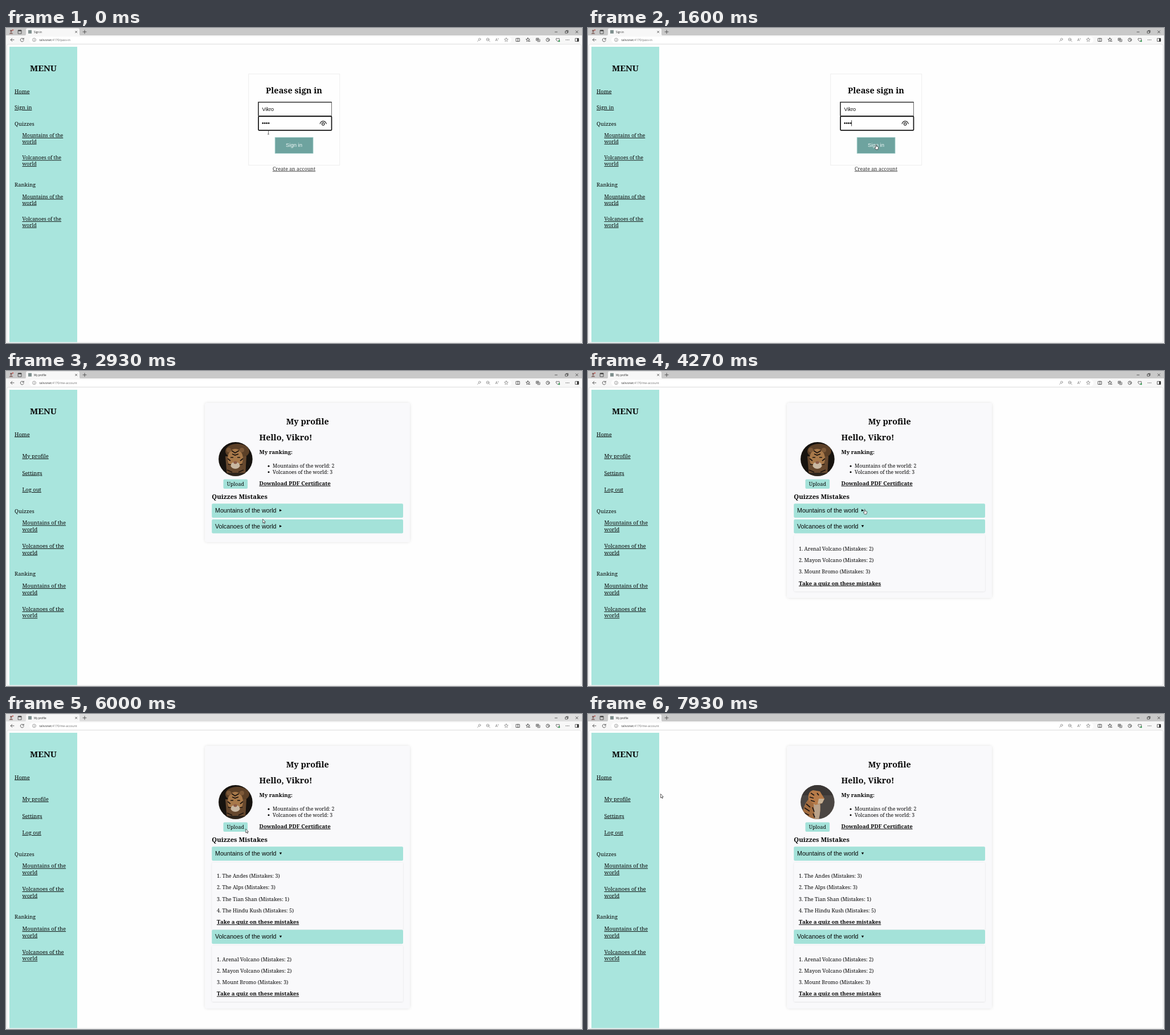
An HTML page that plays this animation: 1011x554 px, repeating every 8 s.

```html
<!DOCTYPE html>
<html lang="en">
<head>
<meta charset="utf-8">
<title>Quiz profile</title>
<style>
  html, body { margin: 0; width: 100%; height: 100%; overflow: hidden; background: #fff; }
  svg { display: block; width: 1011px; height: 554px; }
  .serif { font-family: "Noto Serif", serif; }
  .sans { font-family: "Liberation Sans", Arial, sans-serif; }
  .ui { font-family: "Open Sans", sans-serif; }
  .bold { font-weight: 700; }
  .link { text-decoration: underline; }
  .mid { text-anchor: middle; }
  .icon { fill: none; stroke: #3c3c3c; stroke-width: .8; stroke-linecap: round; }
  .pale { stroke: #8b8b8b; }
</style>
</head>
<body>
<svg id="stage" viewBox="0 0 1011 554" xmlns="http://www.w3.org/2000/svg"></svg>
<script>
const LOOP = 8000;
const STEP = 1000 / 15;
const MINT = '#a4e2d9';
const USER = 'Vikro';
const LIST_SHIFT = 118.7;

const text = (x, y, size, label, cls = 'serif', fill = '#080808') =>
  `<text x="${x}" y="${y}" font-size="${size}" class="${cls}" fill="${fill}">${label}</text>`;
const rect = (x, y, w, h, fill, extra = '') =>
  `<rect x="${x}" y="${y}" width="${w}" height="${h}" fill="${fill}" ${extra}/>`;
const group = (id, content, extra = '') => `<g id="${id}" ${extra}>${content}</g>`;
const icon = (d, cls = '') => `<path class="icon ${cls}" d="${d}"/>`;
const ring = (x, y, r, cls = '') => `<circle class="icon ${cls}" cx="${x}" cy="${y}" r="${r}"/>`;

function star(x, y, cls) {
  const points = Array.from({ length: 10 }, (_, i) => {
    const a = i * Math.PI / 5, r = i % 2 ? 1.6 : 3.5;
    return `${(x + r * Math.sin(a)).toFixed(2)} ${(y - r * Math.cos(a)).toFixed(2)}`;
  });
  return icon(`M${points.join('L')}Z`, cls);
}

function browser() {
  return rect(0, 0, 1011, 14, '#c9c9c9', 'id="titlebar"')
    + rect(0, 13, 1011, 541, '#f7f7f7')
    + '<path d="M32 13.5Q35 13.5 35 10.5V3.5Q35 .5 38 .5H126Q129 .5 129 3.5V10.5Q129 13.5 132 13.5Z" fill="#f7f7f7"/>'
    // tab strip
    + '<circle cx="9" cy="5" r="1.8" fill="#7b5550"/><path d="M5.5 10.5Q9 4.5 12.5 10.5Z" fill="#8b706c"/><circle cx="12" cy="3.6" r="1.1" fill="#c8403a"/>'
    + icon('M21.5 4H27V10H21.5Z') + rect(21.5, 3.7, 5.5, 1.8, '#333')
    + rect(39, 3.7, 6, 6, '#7f8f8e')
    + text(49, 8.7, 4.6, '', 'ui', '#222').replace('<text', '<text id="tabTitle"')
    + icon('M121.7 5.4L124.7 8.4M124.7 5.4L121.7 8.4M135 6.8H141M138 3.8V9.8')
    + icon('M963.5 7H967.5M982 5.5H985.5V9H982ZM983.3 5.3V4.3H986.7V7.8H985.7M1000 4.8L1004 8.8M1004 4.8L1000 8.8')
    // address row
    + rect(41, 15.2, 846, 11.6, '#fff', 'rx="5.8"')
    + icon('M14 20.8H8.2M10.8 18.2L8.2 20.8L10.8 23.4')
    + icon('M30.9 19.5A3 3 0 1 0 31.2 21.8M31.2 17.8V19.8H29.2')
    + ring(49.5, 20.8, 3, 'pale') + icon('M49.5 20.5V22.3M49.5 19.1V19.2', 'pale')
    + `<text x="58.5" y="22.7" font-size="5.3" class="ui" fill="#333">talivonet:<tspan id="path" fill="#6d6d6d"></tspan></text>`
    + ring(831.2, 19.8, 1.8, 'pale') + icon('M830 21.2L827.6 23.6', 'pale')
    + ring(845.6, 20.2, 2.4, 'pale') + icon('M847.5 22L849.4 24M844.5 20.2H846.7', 'pale')
    + text(858.8, 23.2, 6.6, 'A', 'ui', '#777') + icon('M864 18Q865 19 864 20', 'pale')
    + star(878, 20.8, 'pale')
    + icon('M895.5 18.3H901.5V23.5H895.5ZM898.5 18V23.8')
    + star(916, 20.8) + icon('M917.5 23H920')
    + icon('M931 18H935V22H931ZM933 23.8H937V20M933 19V21M932 20H934')
    + ring(951, 20.8, 3) + icon('M951 19V21L952.5 21.5')
    + icon('M968.5 23.8L965.6 20.8Q965 18 967 18L968.5 19L970 18Q972 18 971.4 20.8Z')
    + '<circle cx="971" cy="23" r="1.4" fill="#2c9a4b"/>'
    + [983, 985.5, 988].map(x => `<circle cx="${x}" cy="20.8" r=".65" fill="#222"/>`).join('')
    + icon('M999.5 18.3H1005V23.5H999.5Z') + rect(1002.5, 18, 2.6, 5.8, '#222')
    // page
    + rect(1.5, 28.5, 1008, 524.5, '#fefefe', 'rx="3" stroke="#dedede" stroke-width=".8"')
    + rect(6, 33, 119, 519.5, '#a9e5dd')
    + text(65.5, 76, 15, 'MENU', 'serif bold mid');
}

// A section is a heading with two wrapped links below it.
function menuSection(title, y, size, first, gap, line) {
  return text(15, y, 9.4, title)
    + ['Mountains', 'Volcanoes'].map((name, i) => {
      const top = y + first + i * gap;
      return text(28.5, top, size, `${name} of the`, 'serif link')
        + text(28.5, top + line, size, 'world', 'serif link');
    }).join('');
}

function signInPage() {
  return text(15, 114.5, 9.3, 'Home', 'serif link')
    + text(15, 143, 9.3, 'Sign in', 'serif link')
    + menuSection('Quizzes', 171.5, 8.85, 20.5, 39.3, 10.8)
    + menuSection('Ranking', 279, 8.85, 20.7, 39.3, 10.8)
    + rect(425.7, 80.9, 160, 160.3, '#fefefe', 'stroke="#ececec" stroke-width=".9"')
    + text(505.5, 115, 14.5, 'Please sign in', 'serif bold mid')
    + rect(443, 130.5, 128.5, 24, '#fff', 'stroke="#5a5a5a" stroke-width=".9"')
    + '<path d="M443 154.5V130.5H571.5" fill="none" stroke="#2b2b2b" stroke-width="1.4"/>'
    + text(449.5, 145.6, 9.1, USER, 'sans')
    + rect(443.1, 155.3, 128.4, 24.6, '#fff', 'rx="1.2" stroke="#111" stroke-width="1.7"')
    + [0, 1, 2, 3].map(i => `<circle cx="${450.8 + i * 3.45}" cy="167.4" r="1.4" fill="#111"/>`).join('')
    + rect(462.3, 162.2, .8, 10.4, '#111', 'id="caret"')
    + '<path d="M551.2 168.4Q552.6 163.9 556.7 163.9T562.2 168.4" fill="none" stroke="#222" stroke-width="1.2" stroke-linecap="round"/>'
    + '<circle cx="556.7" cy="168.8" r="2.2" fill="none" stroke="#222" stroke-width="1.2"/>'
    + rect(472.2, 192.4, 66.8, 28.2, '#6ea39f', 'stroke="#9fcfca" stroke-width=".8"')
    + text(505.5, 209.4, 9.5, 'Sign in', 'sans mid', '#f4fbfa')
    + text(505.5, 250.7, 8.8, 'Create an account', 'serif link mid', '#333');
}

function frontPhoto() {
  return rect(373, 125, 60, 60, '#17130f')
    + '<ellipse cx="406" cy="141" rx="21" ry="13" fill="#5c4027"/>'
    + '<path d="M385 150L388 185H420L422 150Z" fill="#66482e"/>'
    + '<ellipse cx="402.5" cy="154" rx="13.5" ry="17" fill="#a8794a"/>'
    + '<circle cx="391" cy="139" r="4" fill="#7d5938"/><circle cx="414" cy="139" r="4" fill="#7d5938"/>'
    + '<ellipse cx="402.5" cy="166" rx="8" ry="6" fill="#c9b8a2"/><ellipse cx="402.5" cy="161" rx="3.2" ry="2.4" fill="#8c5b45"/>'
    + '<path d="M396 140L402 144L409 140M397 146L402 148L408 146M394 152H399M406 152H411M389 154L394 158M416 154L411 158M390 164L395 165M415 164L410 165M388 174L397 178M417 174L408 178" fill="none" stroke="#1d140e" stroke-width="1.7"/>'
    + rect(373, 179, 60, 6, '#2c241c');
}

function sidePhoto() {
  return rect(373, 125, 60, 60, '#4b4643')
    + rect(373, 125, 60, 18, '#3b3735')
    + '<path d="M376 185Q376 161 388 149L407 155Q409 170 405 185Z" fill="#a36d40"/>'
    + '<path d="M396 158L407 155Q409 170 405 185H398Z" fill="#b9a28a"/>'
    + '<path d="M387 151Q385 137 395 134L407 136L415 149L411 157L399 160Z" fill="#b67b49"/>'
    + '<path d="M405 149L415 149L411 157L403 158Z" fill="#c6b196"/>'
    + '<path d="M391 139L397 143M389 146L396 148M391 152L398 154M383 158L390 164M380 165L389 171M378 173L388 178M394 164L397 172M395 175L398 182M402 139L405 143" fill="none" stroke="#1e1815" stroke-width="1.8"/>';
}

function accordion(id, label, lines, y, height) {
  const rows = lines.map((line, i) => text(370, y + 55 + i * 20.15, 9, `${i + 1}. ${line}`)).join('');
  return rect(361.3, y, 335.7, 24.7, MINT, 'rx="2"')
    + text(367, y + 15.6, 10.7, label, 'sans')
    + group(id + 'Shut', `<path d="M480 ${y + 9.9}L484.2 ${y + 12}L480 ${y + 14.1}Z"/>`)
    + group(id + 'Open',
      `<path d="M479.8 ${y + 10.2}H484.2L482 ${y + 14}Z"/>`
      + rect(361.5, y + 27.8, 335.3, height, '#f9f9fb', 'rx="2" filter="url(#soft)"')
      + rows
      + text(370, y + 55.3 + lines.length * 20.15, 9.65, 'Take a quiz on these mistakes', 'serif bold link'));
}

function profilePage() {
  return text(15, 114.5, 9.4, 'Home', 'serif link')
    + ['My profile', 'Settings', 'Log out'].map((s, i) => text(28.5, 153 + i * 29.5, 9.4, s, 'serif link')).join('')
    + menuSection('Quizzes', 249.5, 9.45, 20.8, 40.7, 11.6)
    + menuSection('Ranking', 360.4, 9.45, 20.7, 40.7, 11.6)
    + rect(349.3, 56.3, 359.6, 244.5, '#f9f9fb', 'id="card" rx="4" filter="url(#shade)"')
    + text(529.2, 93.6, 14.4, 'My profile', 'serif bold mid')
    + text(444.5, 122, 14.4, `Hello, ${USER}!`, 'serif bold')
    + text(444.5, 146.3, 9.65, 'My ranking:', 'serif bold')
    + '<circle cx="461" cy="167.2" r="1.5"/><circle cx="461" cy="177.8" r="1.5"/>'
    + text(468, 170, 8.8, 'Mountains of the world: 2')
    + text(468, 180.6, 8.8, 'Volcanoes of the world: 3')
    + text(444.5, 200.8, 9.65, 'Download PDF Certificate', 'serif bold link')
    + group('frontPhoto', frontPhoto(), 'clip-path="url(#avatar)"')
    + group('sidePhoto', sidePhoto(), 'clip-path="url(#avatar)"')
    + rect(381.5, 190.6, 42.6, 16.4, MINT, 'rx="2"')
    + text(402.8, 202, 8.9, 'Upload', 'serif mid')
    + text(361.3, 224.8, 11.3, 'Quizzes Mistakes', 'serif bold')
    + accordion('mountains', 'Mountains of the world', [
      'The Andes (Mistakes: 3)', 'The Alps (Mistakes: 3)',
      'The Tian Shan (Mistakes: 1)', 'The Hindu Kush (Mistakes: 5)'], 233.2, 118)
    + group('volcanoes', accordion('volcano', 'Volcanoes of the world', [
      'Arenal Volcano (Mistakes: 2)', 'Mayon Volcano (Mistakes: 2)',
      'Mount Bromo (Mistakes: 3)'], 260.9, 98.7));
}

// Pointers have their hot spot at 0,0.
function pointers() {
  const look = 'fill="#fff" stroke="#222" stroke-width=".7" stroke-linejoin="round"';
  return group('pointer',
    group('beam', '<path d="M-1.5 -3.5H1.5M0 -3.5V3.5M-1.5 3.5H1.5" fill="none" stroke="#333" stroke-width=".7"/>')
    + group('arrow', `<path d="M0 0V7L1.6 5.6L2.7 8L3.8 7.5L2.7 5.2H4.8Z" ${look}/>`)
    + group('hand', `<path d="M-.7 .7Q0 -.5 .7 .7V3.2L3.8 4Q4.3 4.3 4 5.8L3.2 8.8H-.2L-2.4 5.7Q-2.2 4.7 -.7 5.7Z" ${look}/>`));
}

document.getElementById('stage').innerHTML = `<defs>
  <clipPath id="avatar"><circle cx="402.9" cy="154.9" r="29.8"/></clipPath>
  <filter id="shade" x="-5%" y="-5%" width="110%" height="110%"><feDropShadow dx="0" dy="0" stdDeviation="2.6" flood-opacity=".12"/></filter>
  <filter id="soft" x="-5%" y="-5%" width="110%" height="110%"><feDropShadow dx="0" dy=".4" stdDeviation="1" flood-opacity=".13"/></filter>
</defs>` + browser() + group('signIn', signInPage()) + group('profile', profilePage()) + pointers();

const $ = id => document.getElementById(id);
const show = (id, on) => $(id).setAttribute('display', on ? 'inline' : 'none');

// time, x, y, pointer shape from that time on
const route = [
  [0, 460.5, 183.3, 'beam'], [70, 461, 184, 'arrow'], [200, 473, 193, 'hand'],
  [530, 500, 203, 'hand'], [670, 500, 203, 'hand'], [870, 505.6, 205, 'hand'],
  [2000, 505.6, 205, 'arrow'], [2200, 503, 205, 'arrow'], [2670, 452, 200, 'hand'],
  [2800, 450.5, 200, 'hand'], [2930, 450.7, 260.5, 'arrow'], [3000, 457, 266, 'hand'],
  [3200, 469, 272, 'hand'], [3730, 469, 272, 'hand'], [4270, 485.6, 243, 'hand'],
  [4800, 485.6, 243, 'hand'], [4930, 488.5, 261, 'arrow'], [5200, 425, 205, 'hand'],
  [5330, 417.3, 196, 'hand'], [5870, 417.3, 196, 'arrow'], [6530, 451.6, 255, 'arrow'],
  [7200, 451.6, 255, 'arrow'], [7400, 528, 267, 'arrow'], [7800, 150, 130, 'arrow'],
  [7930, 127.5, 140.5, 'arrow'], [LOOP, 127.5, 140.5, 'arrow']
];

function pointerAt(t) {
  const i = route.findLastIndex(key => key[0] <= t);
  const [t0, x0, y0, shape] = route[i];
  const [t1, x1, y1] = route[i + 1];
  const k = (t - t0) / (t1 - t0);
  const eased = k * k * (3 - 2 * k);
  return { x: x0 + (x1 - x0) * eased, y: y0 + (y1 - y0) * eased, shape };
}

function render(ms) {
  const step = Math.floor((ms % LOOP + 4) / STEP) % 120;
  const t = Math.round(step * STEP / 10) * 10;
  const signedIn = t >= 2000;
  const volcanoOpen = t >= 3470;
  const mountainsOpen = t >= 4530;
  const newPhoto = t >= 7070;

  show('signIn', !signedIn);
  show('profile', signedIn);
  show('caret', Math.floor(step / 8) % 2 === 1);
  $('tabTitle').textContent = signedIn ? 'My profile' : 'Sign in';
  $('path').textContent = signedIn ? '4170/me-account' : '4170/pass-in';
  $('titlebar').setAttribute('fill', t >= 5670 && t < 6730 ? '#dedede' : '#c9c9c9');

  for (const [id, open] of [['volcano', volcanoOpen], ['mountains', mountainsOpen]]) {
    show(id + 'Open', open);
    show(id + 'Shut', !open);
  }
  const shift = mountainsOpen ? LIST_SHIFT : 0;
  $('volcanoes').setAttribute('transform', `translate(0 ${shift})`);
  $('card').setAttribute('height', 244.5 + (volcanoOpen ? 98.2 : 0) + shift);
  show('frontPhoto', !newPhoto);
  show('sidePhoto', newPhoto);

  const { x, y, shape } = pointerAt(t);
  $('pointer').setAttribute('transform', `translate(${x} ${y})`);
  for (const kind of ['beam', 'arrow', 'hand']) show(kind, kind === shape);
}

const start = performance.now();
function tick() {
  render(performance.now() - start);
  requestAnimationFrame(tick);
}
tick();
</script>
</body>
</html>
```
